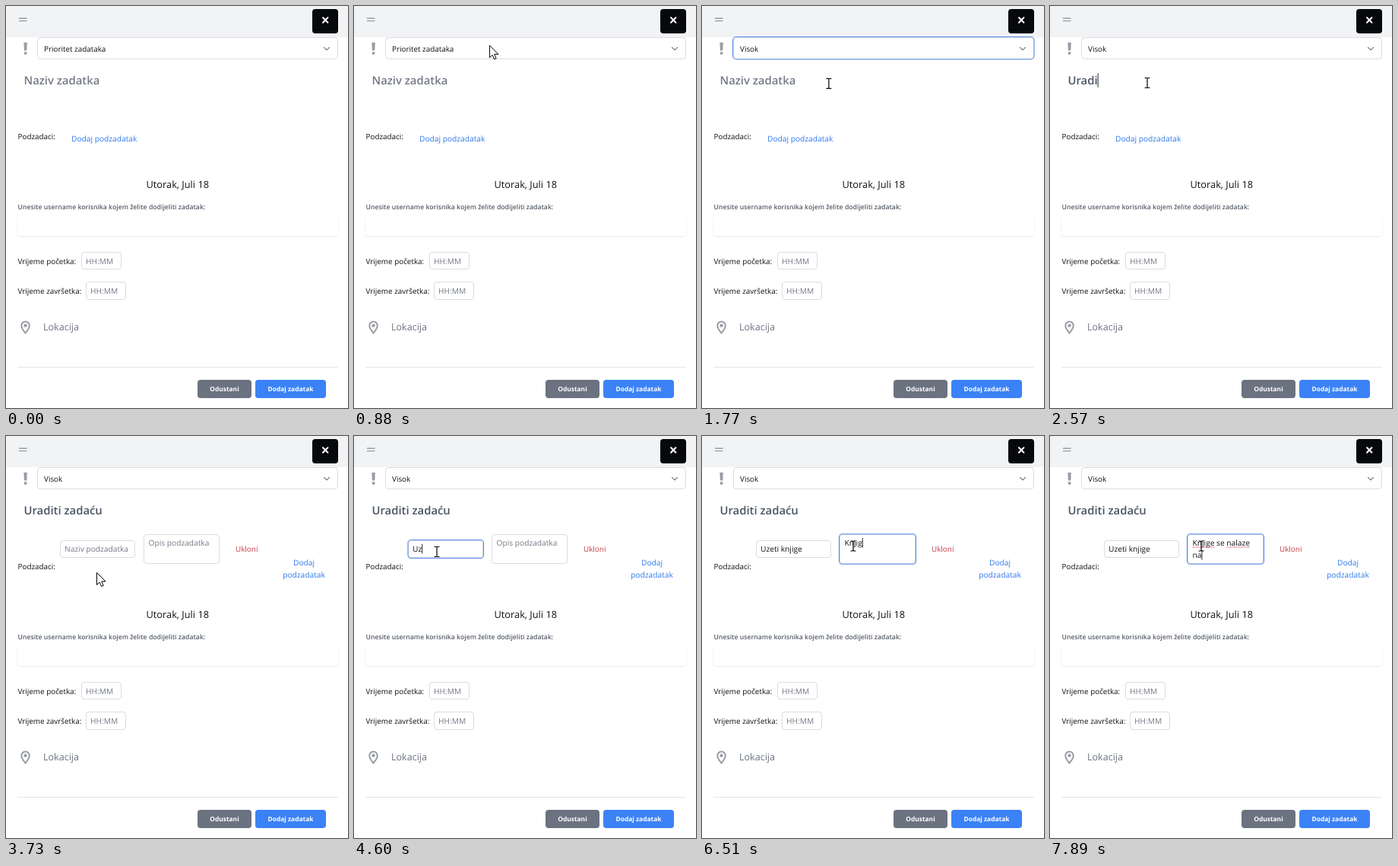
These frames come from a looping animation (450 px wide and 528 px high, 7990 ms). An HTML page:

```html
<!DOCTYPE html>
<html lang="bs">
<head>
<meta charset="utf-8">
<title>Novi zadatak</title>
<style>
  html, body { margin: 0; width: 100%; height: 100%; overflow: hidden; background: #fff; }
  svg { display: block; width: 450px; height: 528px; }
  text {
    font: 9.9px "Open Sans", "Noto Sans", sans-serif;
    fill: #111318;
    white-space: pre;
    text-rendering: geometricPrecision;
  }
  .input { font-size: 10.2px; }
  .option { font-size: 10.3px; }
  .title { font-size: 14.85px; font-weight: 600; fill: #4b5563; }
  .small { font-size: 8.7px; font-weight: 600; }
  .button { font-size: 8.4px; font-weight: 700; }
  .hint { fill: #747a86; }
  .link { fill: #2f7af0; }
  .middle { text-anchor: middle; }
  .white { fill: #fff; }
  .box { fill: #fff; stroke: #d9dce2; }
  .ring { fill: none; stroke: #5b8ce6; stroke-width: 1.1; }
  .icon { fill: #989ca5; }
  .line { fill: none; stroke-linecap: round; }
  .caret { fill: #22262e; }
  .typo { stroke: #e0525c; stroke-width: 1.2; stroke-dasharray: 1.6 .8; }
  .pointer { fill: #fff; stroke: #000; stroke-linejoin: round; }
  #soft { filter: drop-shadow(0 1px 1px rgba(0, 0, 0, .09)); }
  #menu { filter: drop-shadow(1px 2px 2.5px rgba(0, 0, 0, .35)); }
</style>
</head>
<body>
<svg id="stage" viewBox="0 0 450 528">
  <rect width="450" height="41" fill="#f2f3f5"/>
  <path class="icon" d="M17 15.5h10.5v1.4H17zM17 18.9h10.5v1.4H17z"/>
  <rect x="403" y="4" width="34" height="32" rx="4" fill="#07080c"/>
  <path class="line" stroke="#fff" stroke-width="2" d="M417 15.3l6.4 6.4m0-6.4l-6.4 6.4"/>

  <path class="icon" d="M23.4 48h4.4l-.5 10.5h-3.4z"/>
  <circle class="icon" cx="25.6" cy="62" r="2"/>
  <rect class="box" x="41.5" y="41.5" width="395" height="28" rx="4"/>
  <rect id="selectRing" class="ring" x="40.5" y="40.5" width="396.5" height="29.5" rx="4.5"/>
  <text id="choice" x="50" y="59.8"></text>
  <path class="line" stroke="#666b75" stroke-width="1.1" d="M418.5 54.3l3.5 3.5 3.5-3.5"/>

  <text x="15.5" y="174.8">Podzadaci:</text>
  <text id="addWide" class="link input" x="86" y="178">Dodaj podzadatak</text>
  <g id="subtask">
    <rect class="box" x="71.5" y="137.5" width="98" height="22" rx="3.5"/>
    <rect id="nameRing" class="ring" x="71" y="136.5" width="99.5" height="24" rx="4"/>
    <rect class="box" x="181.5" y="129.5" width="99" height="38" rx="3.5"/>
    <rect id="noteRing" class="ring" x="180.5" y="128.8" width="101" height="39.5" rx="4"/>
    <text x="302" y="152" style="fill:#c43c47">Ukloni</text>
    <text class="link input middle" x="392" y="170">Dodaj</text>
    <text class="link input middle" x="392" y="186">podzadatak</text>
  </g>

  <text x="184.5" y="239" style="font-size:12.8px">Utorak, Juli 18</text>
  <text class="small" x="15.5" y="267.2" style="fill:#565d69">Unesite username korisnika kojem želite dodijeliti zadatak:</text>
  <rect id="soft" x="15" y="275" width="422" height="27" rx="4" fill="#fff"/>

  <text x="15.5" y="338.8">Vrijeme početka:</text>
  <rect class="box" x="99.5" y="323.5" width="52" height="22" rx="3.5"/>
  <text class="input hint" x="105" y="339">HH:MM</text>
  <text x="15.5" y="377.8">Vrijeme završetka:</text>
  <rect class="box" x="105.5" y="362.5" width="52" height="23" rx="3.5"/>
  <text class="input hint" x="111" y="378">HH:MM</text>

  <g transform="translate(15.1 411.8) scale(.87)">
    <path class="line" stroke="#989ca5" stroke-width="2.3" d="M12 3C8.7 3 6 5.7 6 9c0 4 4 9 6 11.4C14 18 18 13 18 9c0-3.3-2.7-6-6-6z"/>
    <circle class="icon" cx="12" cy="9" r="2.5"/>
  </g>
  <text x="49" y="426" style="font-size:12.55px;fill:#6b7280">Lokacija</text>

  <rect x="15" y="474" width="422" height="1" fill="#e3e5e9"/>
  <rect x="252" y="491" width="71" height="24" rx="4" fill="#6b7280"/>
  <text class="button white middle" x="287.5" y="506">Odustani</text>
  <rect x="328" y="491" width="93" height="24" rx="4" fill="#3b82f6"/>
  <text class="button white middle" x="374.5" y="506">Dodaj zadatak</text>

  <g id="fields"></g>

  <g id="menu">
    <rect x="41.5" y="70.5" width="395" height="33.5" fill="#fff" stroke="#6d7075"/>
    <rect id="marked" x="42" width="394" height="16.8" fill="#1e90ff"/>
    <text id="optionA" class="option" x="50" y="82.8">Prioritet zadataka</text>
    <text id="optionB" class="option" x="50" y="99">Visok</text>
  </g>

  <g id="cursor">
    <path id="arrow" class="pointer" d="M.5.5v16l3.7-3.5 2.4 5.6 2.6-1.1-2.4-5.5h5.2z"/>
    <path id="hand" class="pointer" d="M-1.5 1.5a1.5 1.5 0 0 1 3 0V7q3-1 3 .8 2.6-.8 2.8.9 2.5-.4 2.4 1.8V14q0 3-2 5v2H-1v-1.5L-5 13.5q-2-3 0-3.5 1.5 0 3.5 2.5z"/>
    <path id="beam" class="line" stroke="#000" stroke-width="1.2" d="M-3-6.5h2l1 .8 1-.8h2M0-5.7V5.7M-3 6.5h2l1-.8 1 .8h2"/>
  </g>
</svg>

<script>
const LOOP = 7990, BLINK = 380;
const MENU_OPEN = 980, MENU_PICK = 1520, TITLE_CLICK = 2080;
const ADD_CLICK = 3610, NAME_CLICK = 4450, NOTE_CLICK = 6120;
const $ = id => document.getElementById(id);
const show = (el, on) => { el.style.display = on ? '' : 'none'; };

// keys: [time, characters typed so far]; typos: [first, end, time noticed]
const fields = [
  { type: 'title', size: 14.85, x: 23.5, y: 103, hint: 'Naziv zadatka', lines: ['Uraditi zadaću'],
    from: 0, focus: TITLE_CLICK, blur: ADD_CLICK,
    keys: [[2190, 1], [3310, 14]], typos: [[0, 7, 2900]] },
  { type: 'input', size: 10.2, x: 77, y: 152, hint: 'Naziv podzadatka', lines: ['Uzeti knjige'],
    from: ADD_CLICK, focus: NAME_CLICK, blur: NOTE_CLICK,
    keys: [[4530, 1], [5130, 12]], typos: [[0, 5, 5270]] },
  { type: 'input', size: 10.2, x: 187.5, y: 144, hint: 'Opis podzadatka', lines: ['Knjige se nalaze ', 'na'],
    from: ADD_CLICK, focus: NOTE_CLICK, blur: LOOP,
    keys: [[6200, 1], [6500, 5], [6880, 10], [6940, 11], [7500, 15], [7720, 16], [7880, 19]],
    typos: [[0, 6, 6650], [10, 16, 7775]] }
];

// time, x, y, shape
const path = [
  [100, 404, 530, 'arrow'], [500, 290, 290, 'arrow'], [800, 169, 40, 'arrow'],
  [900, 180, 54, 'arrow'], [980, 182, 62, 'arrow'], [1100, 183, 100, 'arrow'],
  [MENU_PICK, 183, 100, 'beam'], [1800, 165, 102, 'beam'], [2060, 128, 101, 'beam'],
  [3330, 128, 101, 'beam'], [3400, 124, 120, 'arrow'], [3500, 119, 179, 'hand'],
  [ADD_CLICK, 119, 179, 'arrow'], [3780, 119, 179, 'arrow'], [4080, 111, 159, 'beam'],
  [4250, 109, 152, 'beam'], [5650, 109, 152, 'beam'], [6030, 191, 146, 'beam'], [6110, 199, 144.5, 'beam']
];

function make(tag, parent, attrs) {
  const el = document.createElementNS($('stage').namespaceURI, tag);
  for (const name in attrs) el.setAttribute(name, attrs[name]);
  return parent.appendChild(el);
}

function keyTimes(points) {
  const times = [points[0][0]];
  for (let i = 1; i < points.length; i++) {
    const [t0, n0] = points[i - 1], [t1, n1] = points[i];
    for (let n = n0 + 1; n <= n1; n++) times.push(t0 + (t1 - t0) * (n - n0) / (n1 - n0));
  }
  return times;
}

for (const f of fields) {
  const group = f.group = make('g', $('fields'), {});
  f.hintText = make('text', group, { class: f.type + ' hint', x: f.x, y: f.y });
  f.hintText.textContent = f.hint;
  f.rows = f.lines.map((_, i) => make('text', group, { class: f.type, x: f.x, y: f.y + 16 * i }));
  f.marks = f.typos.map(() => make('line', group, { class: 'typo', y1: f.y + 2, y2: f.y + 2 }));
  f.caret = make('rect', group, { class: 'caret', width: 1, height: f.size * 1.25 });
  f.times = keyTimes(f.keys);
}

function drawField(f, t) {
  const active = t >= f.focus && t < f.blur;
  const count = f.times.filter(k => k <= t).length;
  show(f.group, t >= f.from);
  show(f.hintText, !count);

  let left = count, caretRow = 0;
  f.rows.forEach((row, i) => {
    if (left > 0) caretRow = i;
    row.textContent = f.lines[i].slice(0, Math.max(0, left));
    left -= f.lines[i].length;
  });

  const lastKey = count ? f.times[count - 1] : f.focus;
  const lit = active && Math.floor((t - lastKey) / BLINK) % 2 === 0;
  show(f.caret, lit);
  if (lit) {
    const width = count ? f.rows[caretRow].getComputedTextLength() : 0;
    f.caret.setAttribute('x', f.x + width);
    f.caret.setAttribute('y', f.y + 16 * caretRow - f.size);
  }

  f.typos.forEach(([first, end, noticed], i) => {
    const on = active && t >= noticed;
    show(f.marks[i], on);
    if (!on) return;
    const start = first ? f.rows[0].getSubStringLength(0, first) : 0;
    f.marks[i].setAttribute('x1', f.x + start);
    f.marks[i].setAttribute('x2', f.x + f.rows[0].getSubStringLength(0, end));
  });
}

function drawCursor(t) {
  show($('cursor'), t >= path[0][0]);
  const i = Math.max(0, path.findLastIndex(p => p[0] <= t));
  const [t0, x0, y0, shape] = path[i];
  const [t1, x1, y1] = path[i + 1] || [t0 + 1, x0, y0];
  const p = Math.min(1, Math.max(0, (t - t0) / (t1 - t0)));
  $('cursor').setAttribute('transform', `translate(${x0 + (x1 - x0) * p} ${y0 + (y1 - y0) * p})`);
  for (const name of ['arrow', 'hand', 'beam']) show($(name), name === shape);
}

function draw(t) {
  const second = t >= 1060;
  show($('menu'), t >= MENU_OPEN && t < MENU_PICK);
  $('marked').setAttribute('y', second ? 87 : 71);
  $('optionA').classList.toggle('white', !second);
  $('optionB').classList.toggle('white', second);
  $('choice').textContent = t < MENU_PICK ? 'Prioritet zadataka' : 'Visok';

  show($('addWide'), t < ADD_CLICK);
  show($('subtask'), t >= ADD_CLICK);
  show($('selectRing'), t >= MENU_OPEN && t < TITLE_CLICK);
  show($('nameRing'), t >= NAME_CLICK && t < NOTE_CLICK);
  show($('noteRing'), t >= NOTE_CLICK);

  fields.forEach(f => drawField(f, t));
  drawCursor(t);
}

const begin = performance.now();
function tick() {
  draw((performance.now() - begin) % LOOP);
  requestAnimationFrame(tick);
}
tick();
</script>
</body>
</html>
```
